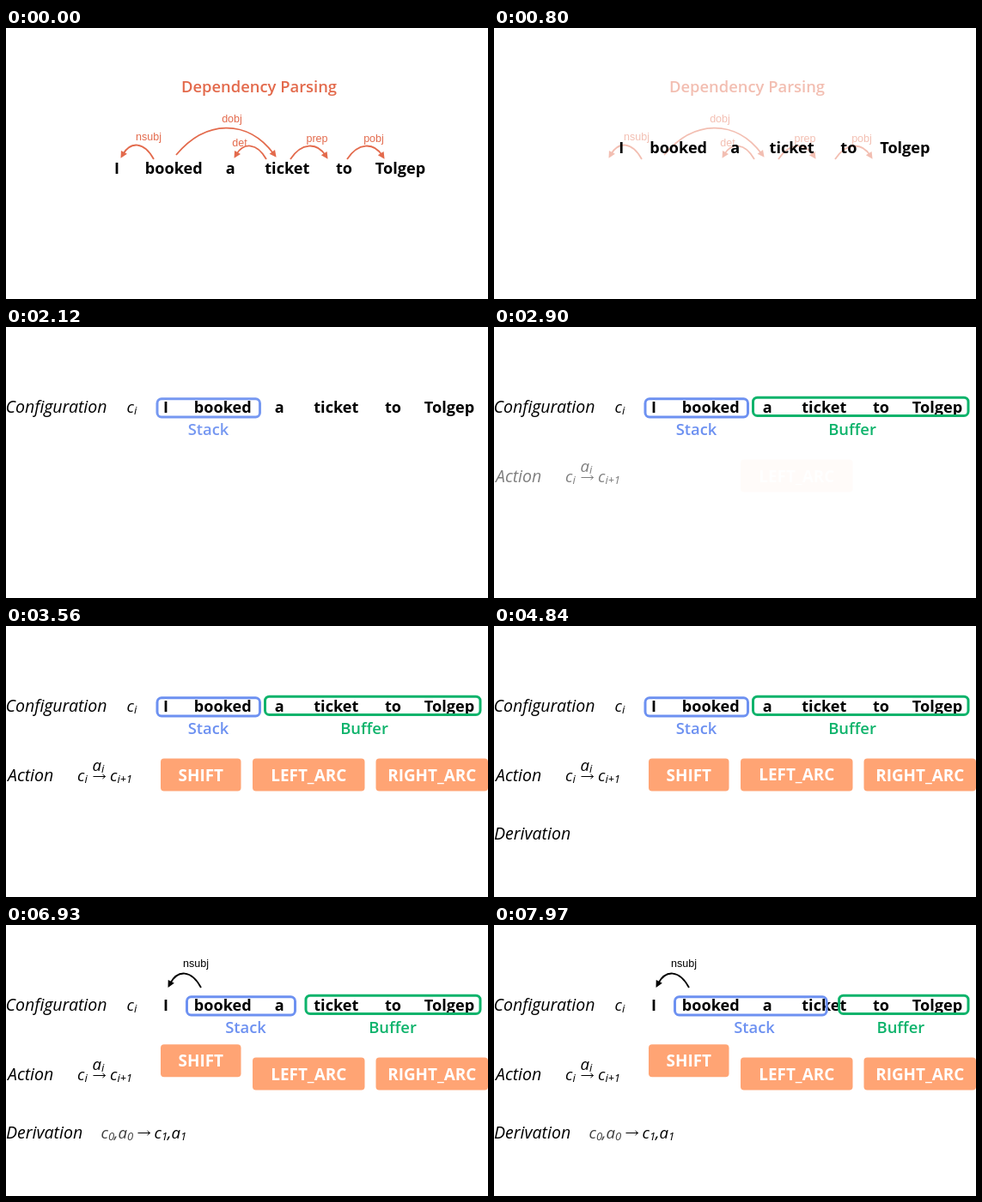
Animation of 561 by 316 pixels, one loop 8 s. Source, as an HTML page:

```html
<!DOCTYPE html>
<html lang="en">
<head>
<meta charset="utf-8">
<title>Dependency parsing</title>
<style>
  html, body { margin: 0; width: 100%; height: 100%; overflow: hidden; background: #fff; }
  svg { display: block; width: 100%; height: 100%; }
  text { font: 600 18.4px "Open Sans", "Noto Sans", sans-serif; }
  .mid { text-anchor: middle; }
  .word { font-weight: 700; font-size: 18.1px; }
  .action { font-weight: 700; font-size: 18.9px; }
  .math { font-weight: 500; font-style: italic; font-size: 18.6px; }
  .math .sub { font-size: 13px; }
  .heading { font-size: 19.6px; }
  .tag { font: 12.5px "Liberation Sans", Arial, sans-serif; }
</style>
</head>
<body>
<svg id="stage" viewBox="0 0 561 316"></svg>
<script>
const LOOP = 8000;
const ORANGE = '#e36a4c', BLUE = '#6d91f1', GREEN = '#0db36b', PEACH = '#ffa474', INK = '#000';
const stage = document.getElementById('stage');

function add(parent, tag, attrs = {}, content = '') {
  const el = document.createElementNS('http://www.w3.org/2000/svg', tag);
  for (const key in attrs) el.setAttribute(key, attrs[key]);
  if (content) el.innerHTML = content;
  parent.append(el);
  return el;
}
const group = (parent = stage) => add(parent, 'g');
const centred = (parent, x, y, str, fill, cls = '') =>
  add(parent, 'text', { x, y, fill, class: 'mid ' + cls }, str);
const heading = (parent, x, y, str) =>
  add(parent, 'text', { x, y, class: 'math heading' }, str);

// In formulas, _x_ marks a subscript.
function math(parent, x, y, str) {
  const parts = str.split('_').map((part, i) => part && (i % 2
    ? `<tspan class="sub" dy="2">${part}</tspan>`
    : `<tspan${i ? ' dy="-2"' : ''}>${part}</tspan>`));
  return add(parent, 'text', { x, y, class: 'math' }, parts.join(''));
}

const stepArrow = (parent, x, y) => add(parent, 'path', {
  d: `M${x} ${y}h14m-3-2.5l3 2.5-3 2.5`, fill: 'none', stroke: INK
});

// Curved arrow from (x1, y1) to (x2, y2) whose top is at height apex.
function arc(parent, x1, y1, x2, y2, apex, color) {
  const cy = (8 * apex - y1 - y2) / 6;
  const c1 = x1 + (x2 - x1) * 0.3, c2 = x1 + (x2 - x1) * 0.72;
  const angle = Math.atan2(y2 - cy, x2 - c2);
  const endX = x2 - 4 * Math.cos(angle), endY = y2 - 4 * Math.sin(angle);
  add(parent, 'path', {
    d: `M${x1} ${y1}C${c1} ${cy} ${c2} ${cy} ${endX} ${endY}`,
    fill: 'none', stroke: color, 'stroke-width': 1.8
  });
  add(parent, 'path', {
    d: 'M1 0L-7-4V4Z', fill: color,
    transform: `translate(${x2} ${y2}) rotate(${angle * 180 / Math.PI})`
  });
}

function button(x, width, str) {
  const g = group();
  add(g, 'rect', { x, y: 154.4, width, height: 38, rx: 4, fill: PEACH });
  centred(g, x + width / 2, 180.5, str, '#fff', 'action');
  return g;
}

const frameBox = (parent, y, color) => add(parent, 'rect', {
  y, height: 21.2, rx: 5, fill: 'none', stroke: color, 'stroke-width': 3
});

// Opening tree
const tree = group();
centred(tree, 294.5, 75, 'Dependency Parsing', ORANGE);
[
  [172, 153, 134, 151, 137, 'nsubj', 166, 131],
  [198, 148, 314, 150, 117, 'dobj', 263, 110],
  [303, 153, 266, 151, 138, 'det', 272, 138],
  [331, 153, 374, 152, 138, 'prep', 362, 133],
  [397, 153, 440, 152, 138, 'pobj', 428, 133]
].forEach(([x1, y1, x2, y2, apex, tag, tx, ty]) => {
  arc(tree, x1, y1, x2, y2, apex, ORANGE);
  centred(tree, tx, ty, tag, ORANGE, 'tag');
});

// Sentence
const words = group();
[['I', 129], ['booked', 195.3], ['a', 261.3], ['ticket', 327.3], ['to', 393.5], ['Tolgep', 459]]
  .forEach(([word, x]) => centred(words, x, 169.8, word, INK, 'word'));

// Configuration row
const config = group();
heading(config, -0.5, 100, 'Configuration');
math(config, 140.5, 100, 'c_i_');
const stack = group(), buffer = group();
const stackBox = frameBox(stack, 83.8, BLUE);
const stackLabel = centred(stack, 0, 126, 'Stack', BLUE);
const bufferBox = frameBox(buffer, 82.2, GREEN);
const bufferLabel = centred(buffer, 0, 126, 'Buffer', GREEN);
const relation = group();
arc(relation, 227, 73, 189, 72, 57, INK);
centred(relation, 221, 49, 'nsubj', INK, 'tag');

// Action row
const action = group();
heading(action, 2, 180.5, 'Action');
math(action, 83, 180.5, 'c_i_');
math(action, 100.5, 168.5, 'a_i_');
stepArrow(action, 101.5, 175.5);
math(action, 121, 180.5, 'c_i+1_');
const shift = button(180, 93.5, 'SHIFT');
const leftArc = button(287, 130.5, 'LEFT_ARC');
const rightArc = button(430.5, 130.5, 'RIGHT_ARC');

// Derivation row
const derivation = group(), first = group(), second = group();
heading(derivation, 0, 249, 'Derivation');
math(first, 110.5, 249, 'c_0_,a_0_');
stepArrow(second, 153.5, 242.5);
math(second, 172.5, 249, 'c_1_,a_1_');

function ease(t, from, to) {
  const p = Math.min(1, Math.max(0, (t - from) / (to - from)));
  return p * p * (3 - 2 * p);
}
const fade = (el, amount) => el.setAttribute('opacity', amount);
const move = (el, x, y) => el.setAttribute('transform', `translate(${x} ${y})`);
function span(box, left, right) {
  box.setAttribute('x', left + 1.5);
  box.setAttribute('width', right - left - 3);
}

function draw(t) {
  const lift = ease(t, 500, 1270);
  move(words, 57 * lift, -70 * lift);
  fade(tree, 1 - ease(t, 500, 1050));

  fade(config, ease(t, 1310, 1800));
  fade(stack, ease(t, 1700, 2200));
  fade(buffer, ease(t, 2130, 2630));
  fade(action, ease(t, 2650, 3150));
  fade(leftArc, ease(t, 2840, 3340));
  fade(shift, ease(t, 2890, 3390));
  fade(rightArc, ease(t, 2890, 3390));
  fade(derivation, ease(t, 3740, 4320));

  // One parser transition per step: left arc, shift, shift.
  const reduce = ease(t, 4840, 5600), take = ease(t, 6210, 6880), next = ease(t, 7430, 8330);
  const blend = (start, a, b, c) => start + a * reduce + b * take + c * next;
  span(stackBox, blend(174.5, 34.5, 0, 0), blend(297, 1, 40, 78));
  span(bufferBox, blend(300, 1.5, 46, 81), 553.5);
  stackLabel.setAttribute('x', blend(235.5, 17.5, 26, 37));
  bufferLabel.setAttribute('x', blend(417, 0.5, 32.5, 36));

  fade(relation, ease(t, 5000, 5600));
  move(leftArc, 0, -15 * (ease(t, 4840, 5400) - ease(t, 6210, 6700)));
  move(shift, 0, -15.2 * ease(t, 6210, 6700));
  fade(first, ease(t, 5250, 5700) - 0.25 * ease(t, 6500, 6920));
  fade(second, ease(t, 6500, 6920));
}

function tick() {
  draw(performance.now() % LOOP);
  requestAnimationFrame(tick);
}
tick();
</script>
</body>
</html>
```
